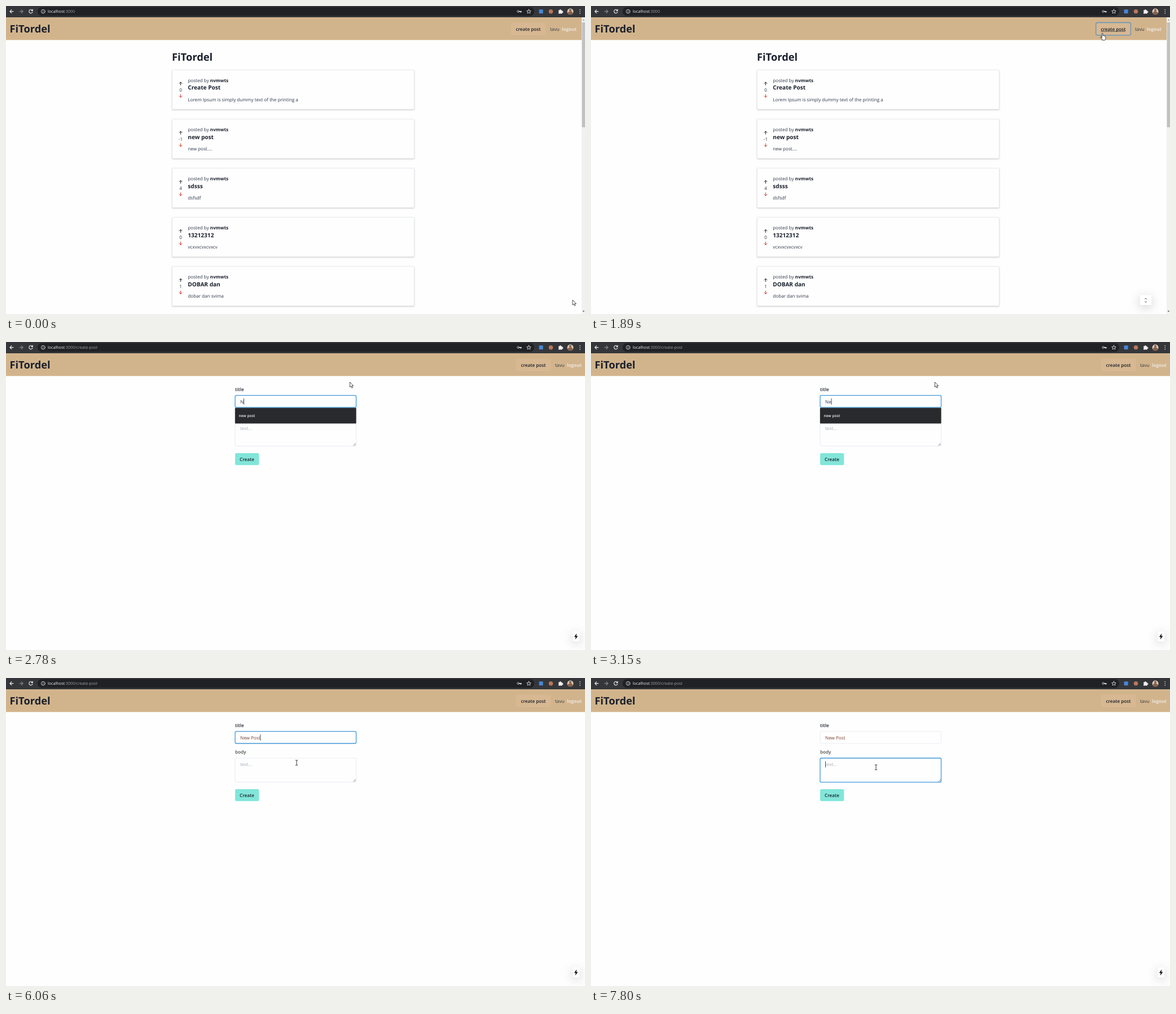
An HTML page that plays this animation: 1026 px wide and 546 px high, repeating every 8 s.

```html
<!DOCTYPE html>
<html lang="en">
<head>
<meta charset="utf-8">
<title>Create post</title>
<style>
html, body { margin: 0; height: 100%; overflow: hidden; background: #fefefe; }
svg { display: block; width: 100vw; height: 100vh; }
text { font: 8.15px "Open Sans", "Noto Sans", sans-serif; fill: #2d3748; white-space: pre; text-rendering: geometricPrecision; }
.h1 { font-size: 18.3px; font-weight: 700; fill: #1a202c; }
.h2 { font-size: 10.1px; font-weight: 700; fill: #1a202c; }
.b { font-weight: 700; fill: #1a202c; }
.m { font-weight: 600; fill: #1a202c; }
.url { font-size: 7.12px; fill: #9aa0a6; }
.mid { text-anchor: middle; }
.hint { fill: #a3adba; }
.line { fill: none; stroke-linecap: round; stroke-linejoin: round; }
.card { fill: #fefefe; stroke: #e8ebef; stroke-width: 1; filter: drop-shadow(0 1.5px 1.3px #0003); }
.float { fill: #fff; filter: drop-shadow(0 4px 9px #0003); }
.field { fill: #fefefe; stroke: #e2e8f0; stroke-width: .8; }
.field.hover { stroke: #fefefe; }
.field.focus { stroke: #4299d8; stroke-width: 1.3; }
</style>
</head>
<body>
<svg viewBox="0 0 1026 546" preserveAspectRatio="none">
  <rect width="1026" height="546" fill="#fefefe"/>

  <g id="list">
    <text class="h1" x="294" y="96.5">FiTordel</text>
    <g id="cards"></g>
    <g id="compile">
      <rect class="float" x="973" y="512.5" width="20" height="17.5" rx="1"/>
      <path class="line" d="M981.6 519.4l1.4-1.4 1.4 1.4M981.6 524.2l1.4 1.2 1.4-1.2" stroke="#333" stroke-width=".9"/>
    </g>
  </g>

  <g id="form">
    <text class="m" x="406" y="87">title</text>
    <rect id="titleBox" class="field" x="406" y="94.7" width="214.5" height="21.3" rx="2.2"/>
    <text id="titleText" x="415" y="109"></text>
    <text id="bodyLabel" class="m" x="406" y="134">body</text>
    <rect id="bodyBox" class="field" x="406" y="142" width="214.5" height="42.6" rx="2.2"/>
    <text class="hint" x="415" y="156">text...</text>
    <path class="line" d="M615.5 183.5l4-4M618 183.5l1.5-1.5" stroke="#666" stroke-width=".7"/>
    <rect id="caret" width=".8" height="11" fill="#222"/>
    <rect x="406" y="197" width="42.3" height="21.3" rx="2.5" fill="#81e6d9"/>
    <text class="m mid" x="427" y="211">Create</text>
    <g id="menu">
      <rect x="405.8" y="116.8" width="214.8" height="27.8" rx="1" fill="#292a2d"/>
      <text class="m" x="412.5" y="133.2" style="font-size:6.6px;fill:#f1f1f1">new post</text>
    </g>
    <rect class="float" x="1004.5" y="513" width="11.5" height="17.5" rx="2"/>
    <path d="M1011.4 516.6l-4.6 6.2h2.7l-.8 4.8 4.7-6.4h-2.8z" fill="#111"/>
  </g>

  <rect id="header" y="20" height="40.3" fill="#d2b48c"/>
  <text class="h1" x="6.5" y="47.3">FiTordel</text>
  <g id="nav">
    <rect id="button" x="894.7" y="29.4" width="61.7" height="22.3" rx="3" fill="#d7b892"/>
    <text class="m" x="903.5" y="43.6">create post</text>
    <path id="underline" d="M903.5 45H947" stroke="#1a202c" stroke-width=".7"/>
    <text x="964" y="43.6">tavu</text>
    <text class="b" x="985" y="43.6" style="fill:#ebe5dd">logout</text>
  </g>

  <g id="scrollbar">
    <rect x="1020" y="20" width="6" height="526" fill="#f1f1f1"/>
    <rect x="1020.6" y="29" width="5.4" height="186" fill="#c1c1c1"/>
    <path d="M1021.6 25.8l1.8-2 1.8 2z" fill="#888"/>
    <path d="M1021.6 540.2l1.8 2 1.8-2z" fill="#444"/>
  </g>

  <rect width="1026" height="20" fill="#35363a"/>
  <rect x="56" y="2" width="880" height="15.5" rx="7.7" fill="#202124"/>
  <g class="line" stroke="#f1f1f1" stroke-width="1.1">
    <path d="M13 9.6H7M9.8 6.7L6.9 9.6l2.9 2.9"/>
    <path d="M24 9.6h6M27.2 6.7l2.9 2.9-2.9 2.9" stroke="#85868a"/>
    <path d="M46.6 7.6A3.2 3.2 0 1 0 47 10.6M47.2 6v2.4h-2.4"/>
    <g stroke-width=".8">
      <circle cx="65.8" cy="9.7" r="3.4"/>
      <path d="M65.8 9.3v2M65.8 7.7v.1"/>
      <circle cx="907.6" cy="9.6" r="1.7"/>
      <path d="M909.4 9.6h3.6v1.4M911.3 9.6v1.2" stroke-width="1.2"/>
      <path d="M926.5 6l1.1 2.5 2.7.2-2 1.8.6 2.6-2.4-1.4-2.4 1.4.6-2.6-2-1.8 2.7-.2z"/>
    </g>
  </g>
  <text class="url" x="74" y="12.3"><tspan fill="#f1f3f4">localhost</tspan>:3000<tspan id="path"></tspan></text>
  <rect x="944.6" y="6.2" width="7" height="7" fill="#4688d8"/>
  <circle cx="965.5" cy="9.8" r="3.8" fill="#b9775d"/>
  <path d="M979 7.4h2a1.3 1.3 0 1 1 2.6 0h2v2a1.3 1.3 0 1 1 0 2.4v1.6h-6.6v-2a1.2 1.2 0 0 0 0-2.2z" fill="#f1f1f1"/>
  <circle cx="1000" cy="9.8" r="5.5" fill="#d9cbbb"/>
  <path d="M995.5 13a4.6 4.6 0 0 1 9 0 5.5 5.5 0 0 1-9 0z" fill="#8c6046"/>
  <circle cx="1000" cy="7.4" r="2.1" fill="#8c6046"/>
  <path d="M1017.2 6.6v.1M1017.2 9.7v.1M1017.2 12.8v.1" class="line" stroke="#f1f1f1" stroke-width="1.5"/>

  <g id="cursor">
    <circle id="click" r="6.2" fill="#ffec1f"/>
    <path id="arrow" d="M0 0V9L2.1 7.2 3.6 10.4 5 9.8 3.6 6.7H6.4Z" fill="#fff" stroke="#222" stroke-width=".8"/>
    <path id="hand" d="M-1.6 1.5V-5.2Q-1.6-6.2-.7-6.2T.2-5.2V-2Q2-2.4 2.2-1.4 3.8-1.8 4-.4 5-.6 5 .8V2.5Q5 4.2 3.8 6H-1.3Q-2 0-4.3 1.4-4.4.2-3.4.1-2.4.2-1.6 1.5Z" fill="#fff" stroke="#222" stroke-width=".8"/>
    <path id="beam" class="line" d="M-1.8-4.5Q0-4.5 0-3.8 0-4.5 1.8-4.5M0-3.8V3.8M-1.8 4.5Q0 4.5 0 3.8 0 4.5 1.8 4.5" stroke="#222" stroke-width=".9"/>
  </g>
</svg>

<script>
const LOOP = 8000;
const $ = id => document.getElementById(id);
const show = (id, on) => $(id).style.display = on ? "" : "none";
const between = (t, a, b) => t >= a && t < b;

const posts = [
  [0, "Create Post", "Lorem Ipsum is simply dummy text of the printing a"],
  [-1, "new post", "new post...."],
  [4, "sdsss", "dsfsdf"],
  [0, "13212312", "vcxvxcvxcvxcv"],
  [1, "DOBAR dan", "dobar dan svima"]
];
$("cards").innerHTML = posts.map(([votes, title, body], i) => `
  <g transform="translate(294 ${113.4 + i * 87.1})">
    <rect class="card" x=".5" width="428.7" height="69.6" rx="1"/>
    <path class="line" d="M15.5 26.8v-5M13 24l2.5-2.5L18 24" stroke="#222" stroke-width="1"/>
    <text class="mid" x="15.5" y="38.2">${votes}</text>
    <path class="line" d="M15.5 43.4v5M13 46.2l2.5 2.5 2.5-2.5" stroke="#c53a30" stroke-width="1"/>
    <text x="28.3" y="21.2">posted by <tspan class="b">nvmwts</tspan></text>
    <text class="h2" x="28.3" y="35">${title}</text>
    <text x="28.3" y="55.7">${body}</text>
  </g>`).join("");

// Pointer moves: first step, step length, step count, end point, ease exponent
const moves = [
  [130, 120, 6, 909.5, 57.5, 1],
  [870, 125, 3, 907, 54.5, 1],
  [2020, 125, 3, 498, 96, .7],
  [2410, 120, 2, 487, 102, 1],
  [2780, 1, 1, 609.3, 71, 1],
  [3260, 1, 1, 610, 71, 1],
  [5540, 130, 2, 545, 126, 1],
  [5810, 123, 4, 505, 158.3, 1]
];
function pointer(t) {
  let x = 1004, y = 521;
  for (const [start, step, count, toX, toY, ease] of moves) {
    if (t < start) break;
    const p = Math.min(count, Math.floor((t - start) / step) + 1) / count;
    x += (toX - x) * p ** ease;
    y += (toY - y) * p ** ease;
  }
  return [x, y];
}

const keyTimes = [2780, 3150, 3260, 3760, 4260, 4540, 4640, 5020];

function draw(t) {
  const onForm = t >= 2020, inBody = t >= 6680, late = t >= 5940;

  show("list", !onForm);
  show("scrollbar", !onForm);
  show("form", onForm);
  show("compile", t >= 1760);
  $("path").textContent = onForm ? "/create-post" : "";
  $("header").setAttribute("width", onForm ? 1026 : 1020);
  $("nav").setAttribute("transform", `translate(${onForm ? 9 : 0} 0)`);
  show("underline", between(t, 870, 2020));
  const ring = between(t, 1490, 2020);
  $("button").setAttribute("stroke", ring ? "#7198b4" : "none");
  $("button").setAttribute("stroke-width", 1.6);

  const typed = "New Post".slice(0, keyTimes.filter(k => t >= k).length);
  const title = $("titleText");
  title.textContent = typed || "title";
  title.style.fill = !typed ? "#a3b5b5" : late ? "#77402f" : "#2d3748";
  $("bodyLabel").style.fill = late ? "#475044" : "#1a202c";
  show("menu", between(t, 2780, 5940));

  const inTitle = typed && !inBody;
  $("titleBox").setAttribute("class", "field " + (inTitle ? "focus" : between(t, 2270, 2780) ? "hover" : ""));
  $("bodyBox").setAttribute("class", "field " + (inBody ? "focus" : t >= 6570 ? "hover" : ""));
  show("caret", typed && !between(t, 5540, 6060) && !between(t, 7190, 7800));
  if (onForm) {
    $("caret").setAttribute("x", inBody ? 415 : 415 + title.getComputedTextLength());
    $("caret").setAttribute("y", inBody ? 147.5 : 100);
  }

  const [x, y] = pointer(t);
  $("cursor").setAttribute("transform", `translate(${x} ${y})`);
  const hand = between(t, 870, 2020);
  const beam = between(t, 2270, 2780) || t >= 6060;
  show("hand", hand);
  show("beam", beam);
  show("arrow", !hand && !beam);
  show("click", between(t, 6570, 6680));
}

const began = performance.now();
function tick() {
  draw((performance.now() - began) % LOOP);
  requestAnimationFrame(tick);
}
tick();
</script>
</body>
</html>
```
